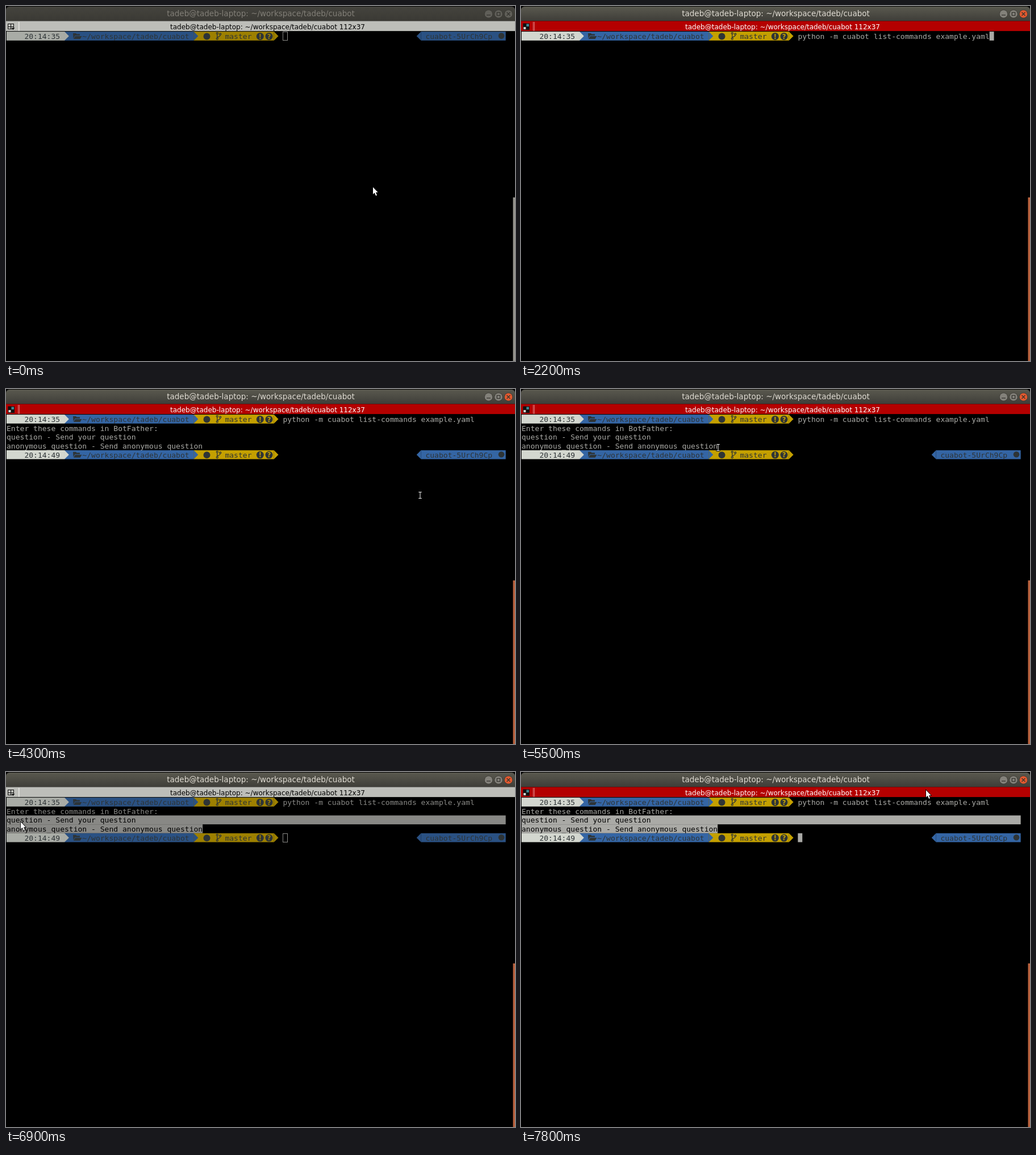
These frames come from a looping animation (896 px wide and 625 px high, 8000 ms). An HTML page with a canvas:

```html
<!DOCTYPE html>
<html lang="en">
<head>
<meta charset="utf-8">
<title>Terminal</title>
<style>
html, body { margin: 0; width: 100%; height: 100%; overflow: hidden; background: #000; }
canvas { display: block; width: 896px; height: 625px; }
</style>
</head>
<body>
<canvas id="stage" width="896" height="625"></canvas>
<script>
const ctx = document.getElementById('stage').getContext('2d');
const LOOP = 8000, CELL = 7.845, LINE = 15.68;
const MONO = '13.03px "DejaVu Sans Mono", monospace';
const SANS = '"DejaVu Sans", sans-serif';
const INK = '#2e3436', FG = [170, 170, 166], PALE = [211, 215, 207],
      BLUE = [52, 101, 164], GOLD = [196, 160, 0];
const CMD = 'python -m cuabot list-commands example.yaml';
const HOME = 'tadeb@tadeb-laptop: ~/workspace/tadeb/cuabot';
const OUTPUT = [
  'Enter these commands in BotFather:',
  'question - Send your question',
  'anonymous_question - Send anonymous question'
];

// [time, shape, x, y]: the shape stays until the next entry
const POINTER = [
  [0, 'arrow', 646, 319], [100, 'beam', 648.5, 321.5], [900, 'none', 0, 0],
  [4100, 'beam', 640, 186], [4200, 'beam', 700, 189], [4300, 'beam', 729, 187],
  [4500, 'beam', 300, 140], [4600, 'beam', 106, 79], [4700, 'beam', 155, 128],
  [4900, 'beam', 215, 122], [5000, 'beam', 270, 114], [5100, 'beam', 312, 107],
  [5200, 'beam', 334, 104], [5300, 'beam', 344, 103], [5400, 'beam', 347, 103],
  [5800, 'beam', 260, 102], [5900, 'beam', 150, 100], [6000, 'beam', 74, 98],
  [6200, 'beam', 40, 92], [6300, 'beam', 9, 86], [6500, 'beam', 14, 87],
  [6700, 'beam', 26, 92], [6900, 'arrow', 26, 88],
  [7200, 'beam', 60, 100], [7300, 'beam', 150, 96], [7400, 'beam', 300, 84],
  [7500, 'beam', 460, 70], [7600, 'beam', 590, 56], [7700, 'arrow', 680, 38],
  [7800, 'arrow', 713, 32]
];
// [time, row, column] where the selection begins
const SELECT = [[5800, 3, 33], [5900, 3, 19], [6000, 2, 5], [6200, 2, 2], [6300, 2, 1], [6500, 2, 0]];

let dim = 1;
const at = (list, t) => list.filter(k => k[0] <= t).pop();
const colX = c => 1 + c * CELL;
const rowY = r => 45.1 + r * LINE;
const tone = c => `rgb(${c.map(v => Math.round(v * dim)).join()})`;

function box(color, x, y, w, h) {
  ctx.fillStyle = color;
  ctx.fillRect(x, y, w, h);
}

function poly(color, ...p) {
  ctx.fillStyle = color;
  ctx.beginPath();
  for (let i = 0; i < p.length; i += 2) ctx.lineTo(p[i], p[i + 1]);
  ctx.closePath();
  ctx.fill();
}

function disc(color, x, y, r) {
  ctx.fillStyle = color;
  ctx.beginPath();
  ctx.arc(x, y, r, 0, Math.PI * 2);
  ctx.fill();
}

function label(text, x, y, font, color) {
  ctx.font = font;
  ctx.fillStyle = color;
  ctx.textAlign = 'center';
  ctx.fillText(text, x, y);
}

function type(text, col, row, color) {
  ctx.font = MONO;
  ctx.fillStyle = color;
  ctx.textAlign = 'left';
  [...text].forEach((ch, i) => ctx.fillText(ch, colX(col + i), rowY(row) + 13));
}

function fillCells(color, col, end, row) {
  box(color, colX(col), rowY(row), (end - col) * CELL, LINE);
}

function wedge(color, col, row, dir) {
  const x = colX(col), y = rowY(row);
  const base = dir > 0 ? x : x + CELL, tip = dir > 0 ? x + CELL : x;
  poly(color, base, y, tip, y + LINE / 2, base, y + LINE);
}

function folder(y) {
  poly(INK, 118, y + 3, 123, y + 3, 124.5, y + 4.5, 130, y + 4.5, 130, y + 7, 121.5, y + 7, 118.5, y + 12);
  poly(INK, 122, y + 8, 133.5, y + 8, 130.5, y + 13, 118.8, y + 13);
}

function branch(y) {
  ctx.strokeStyle = INK;
  ctx.lineWidth = 1.3;
  ctx.beginPath();
  for (const [x, d] of [[371.8, 3], [371.8, 12.5], [377.2, 4.5]]) {
    ctx.moveTo(x + 1.5, y + d);
    ctx.arc(x, y + d, 1.5, 0, Math.PI * 2);
  }
  ctx.moveTo(371.8, y + 4.5);
  ctx.lineTo(371.8, y + 11);
  ctx.moveTo(377.2, y + 6);
  ctx.quadraticCurveTo(377, y + 8.5, 371.8, y + 10);
  ctx.stroke();
}

function prompt(row, clock) {
  const y = rowY(row), gold = tone(GOLD);
  fillCells(tone(PALE), 0, 13, row);
  fillCells(tone(BLUE), 13, 42, row);
  fillCells(gold, 42, 60, row);
  wedge(tone(PALE), 13, row, 1);
  wedge(tone(BLUE), 42, row, 1);
  wedge(gold, 60, row, 1);
  type(clock, 4, row, INK);
  folder(y);
  type('~/workspace/tadeb/cuabot', 17, row, INK);
  disc(INK, 353.5, y + 8.5, 6);
  branch(y);
  type('master', 49, row, INK);
  ['!', '?'].forEach((mark, i) => {
    const x = 447.3 + i * 15.7;
    disc(INK, x, y + 8.3, 6.5);
    label(mark, x, y + 12.6, 'bold 11.5px ' + SANS, gold);
  });
}

function rightPrompt(row) {
  fillCells(tone(BLUE), 93, 112, row);
  wedge(tone(BLUE), 92, row, -1);
  type('cuabot-5UrCh9Cp', 94, row, INK);
  disc(INK, 872, rowY(row) + 7.5, 5.3);
}

function windowBar(title, active) {
  const g = ctx.createLinearGradient(0, 1, 0, 26.5);
  g.addColorStop(0, active ? '#5a594f' : '#45443e');
  g.addColorStop(1, active ? '#3e3d38' : '#3a3934');
  ctx.fillStyle = g;
  ctx.beginPath();
  ctx.roundRect(0, 1, 896, 25.5, [6, 6, 0, 0]);
  ctx.fill();
  label(title, 448.5, 18.3, '13.5px ' + SANS, active ? '#dfdbd2' : '#817e77');
  [849.5, 867, 884.5].forEach((x, i) => {
    const face = !active ? '#605f59' : i === 2 ? '#e2592f' : '#83817a';
    disc('#383732', x, 14, 7.4);
    disc(face, x, 14, 6.8);
    ctx.strokeStyle = '#35342f';
    ctx.lineWidth = 1.3;
    ctx.beginPath();
    if (i === 0) { ctx.moveTo(x - 3.5, 16); ctx.lineTo(x + 3.5, 16); }
    if (i === 1) ctx.rect(x - 2.7, 11.3, 5.4, 5.4);
    if (i === 2) {
      ctx.moveTo(x - 3, 11); ctx.lineTo(x + 3, 17);
      ctx.moveTo(x + 3, 11); ctx.lineTo(x - 3, 17);
    }
    ctx.stroke();
  });
}

function paneBar(title, focus) {
  box(focus ? '#b40000' : '#bdbeb9', 0, 26.5, 896, 17.6);
  label(title + ' 112x37', 460.5, 41.2, '12px ' + SANS, focus ? '#fff' : '#000');
  if (focus) {
    box('#111', 3.5, 30.5, 11.5, 11.5);
    box('#3f8792', 9.5, 31.5, 4.5, 4.5);
    box('#d8d8d4', 4.5, 37, 4, 4);
    box('#e08080', 21, 28, 1, 16);
    box('#e08080', 23, 28, 1, 16);
  } else {
    ctx.strokeStyle = '#111';
    ctx.lineWidth = 1;
    ctx.strokeRect(3.5, 31.5, 10, 9);
    box('#111', 8, 31, 1, 10);
    box('#111', 3, 36, 11, 1);
    poly('#111', 9.5, 38.5, 15.5, 38.5, 12.5, 42);
    box('#e8e8e4', 22, 28, 1.5, 16);
  }
}

function cursor(col, row, focus, color) {
  if (focus) return fillCells(color || tone(FG), col, col + 1, row);
  ctx.strokeStyle = tone(FG);
  ctx.lineWidth = 1;
  ctx.strokeRect(Math.round(colX(col)) + .5, Math.round(rowY(row)) + .5, 8, 15);
}

function commandLine(t, focus) {
  if (t < 1100) return cursor(62, 0, focus);
  const typed = t < 1400 ? 2 : t < 1600 ? 5 : t < 2200 ? 6 : CMD.length;
  type(CMD.slice(0, typed), 62, 0, tone(FG));
  if (typed < CMD.length) {
    cursor(62 + typed, 0, true, typed === 6 ? tone(FG) : '#676864');
    type(CMD[typed], 62 + typed, 0, '#161616');
    type(CMD.slice(typed + 1), 63 + typed, 0, '#555753');
  } else if (t < 3500 && (t < 2700 || t >= 3300)) {
    cursor(105, 0, true);
  }
}

function output(t) {
  const sel = at(SELECT, t);
  OUTPUT.forEach((line, i) => {
    const row = i + 1;
    type(line, 0, row, tone(FG));
    if (!sel || row < sel[1]) return;
    const start = row === sel[1] ? sel[2] : 0;
    fillCells(tone(FG), start, row === 3 ? 44 : 112, row);
    type(line.slice(start), start, row, '#000');
  });
}

function arrow(x, y) {
  ctx.beginPath();
  [[0, 0], [0, 12.5], [2.8, 9.8], [5, 15], [7, 14.2], [4.9, 9.2], [8.6, 9]]
    .forEach(([dx, dy]) => ctx.lineTo(x + dx, y + dy));
  ctx.closePath();
  ctx.lineWidth = 1.6;
  ctx.strokeStyle = '#000';
  ctx.stroke();
  ctx.fillStyle = '#fff';
  ctx.fill();
}

function beam(x, y) {
  for (const [color, e] of [['#000', .8], ['#fff', 0]]) {
    box(color, x - .6 - e, y - 6 - e, 1.2 + e * 2, 12 + e * 2);
    for (const d of [-6, 5]) box(color, x - 2.7 - e, y + d - e, 5.4 + e * 2, 1 + e * 2);
  }
  box('#222', x - .25, y - 5, .5, 10);
}

function draw(t) {
  const active = t >= 400;
  const focus = active && !(t >= 6900 && t < 7200);
  const title = t >= 3600 && t < 3900 ? CMD : HOME;
  dim = focus ? 1 : .8;
  box('#000', 0, 0, 896, 625);
  windowBar(title, active);
  paneBar(title, focus);
  box(active ? '#b9623d' : '#96948d', 892.5, 337, 3.5, 288);

  prompt(0, '20:14:35');
  if (t < 1100) rightPrompt(0);
  commandLine(t, focus);
  if (t >= 3500 && t < 3900) cursor(0, 1, true);
  if (t >= 3900) {
    output(t);
    prompt(4, '20:14:49');
    if (t >= 4100) rightPrompt(4);
    if ((t >= 4500 && t < 5100) || t >= 5700) cursor(62, 4, focus);
  }

  const [, shape, x, y] = at(POINTER, t);
  if (shape === 'arrow') arrow(x, y);
  if (shape === 'beam') beam(x, y);
}

const began = performance.now();
function tick() {
  draw((performance.now() - began) % LOOP);
  requestAnimationFrame(tick);
}
tick();
</script>
</body>
</html>
```
